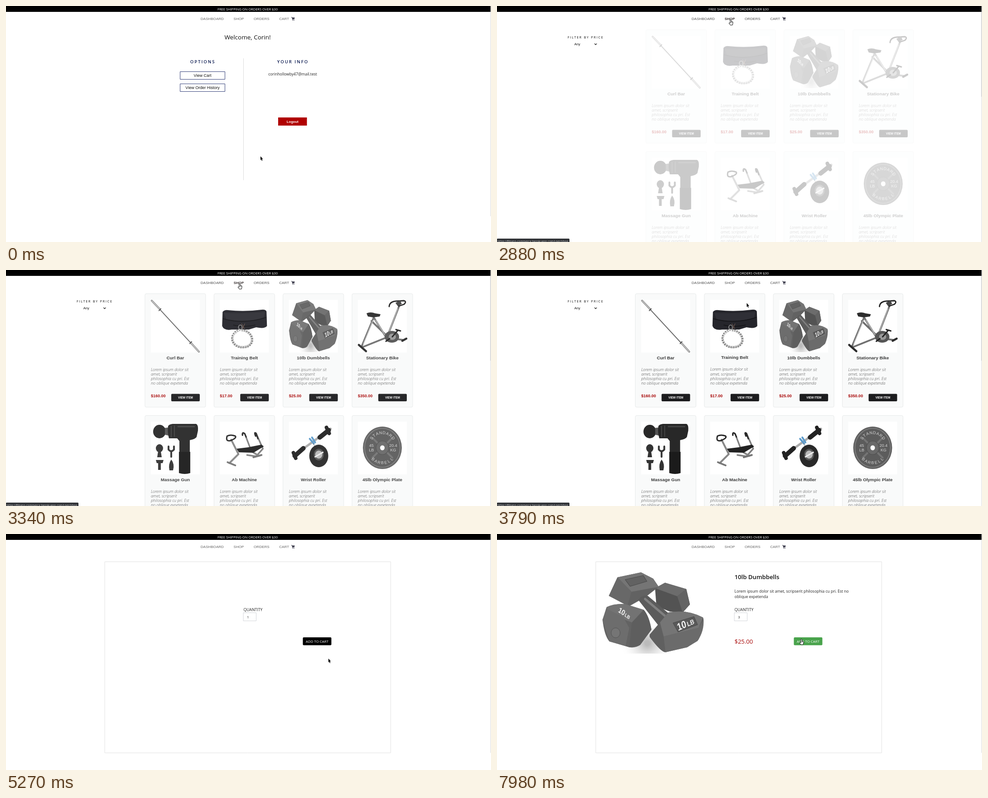
These frames come from a looping animation (1071x523 px, 8 s). An HTML page with a canvas:

```html
<!DOCTYPE html>
<html lang="en">
<head>
<meta charset="utf-8">
<title>Fitness shop</title>
<style>
html, body { margin: 0; width: 100%; height: 100%; overflow: hidden; background: #fff; }
canvas { display: block; width: 100%; height: 100%; }
</style>
</head>
<body>
<canvas id="stage" width="1071" height="523"></canvas>
<script>
const ctx = document.getElementById('stage').getContext('2d');
const LOOP = 8000, STEP = 77;
const ARIAL = '"Liberation Sans", Arial, sans-serif';
const SANS = '"Open Sans", "Noto Sans", sans-serif';
const NAVY = '#0b1a50', RED = '#a80808';

const clamp = v => Math.max(0, Math.min(1, v));
// The screen advances in ticks; returns the share of n ticks done since start.
const ticks = (t, start, n) =>
  t < start ? 0 : Math.min(n, Math.floor((t - start) / STEP + 0.15) + 1) / n;

function text(s, x, y, font, color, align = 'left', spacing = 0) {
  ctx.font = font;
  ctx.fillStyle = color;
  ctx.textAlign = align;
  ctx.letterSpacing = spacing + 'px';
  ctx.fillText(s, x, y);
}

function box(x, y, w, h, fill, stroke, r = 0) {
  ctx.beginPath();
  ctx.roundRect(x, y, w, h, r);
  if (fill) { ctx.fillStyle = fill; ctx.fill(); }
  if (stroke) { ctx.lineWidth = 1; ctx.strokeStyle = stroke; ctx.stroke(); }
}

function fill(d, color) {
  ctx.fillStyle = color;
  ctx.fill(new Path2D(d));
}

function line(d, color, w, cap = 'round') {
  ctx.lineCap = cap;
  ctx.lineJoin = 'round';
  ctx.lineWidth = w;
  ctx.strokeStyle = color;
  ctx.stroke(new Path2D(d));
}

function oval(x, y, rx, ry, color, stroke, w = 1) {
  ctx.beginPath();
  ctx.ellipse(x, y, rx, ry, 0, 0, 7);
  if (color) { ctx.fillStyle = color; ctx.fill(); }
  if (stroke) { ctx.lineWidth = w; ctx.strokeStyle = stroke; ctx.stroke(); }
}

function at(x, y, draw, sx = 1, sy = sx, turn = 0) {
  ctx.save();
  ctx.translate(x, y);
  ctx.scale(sx, sy);
  ctx.rotate(turn);
  draw();
  ctx.restore();
}

// Product pictures, each in a 108 x 116 field.
function curlBar() {
  line('M2 2L106 115', '#8a8a8a', 2.2);
  line('M2 2L106 115', '#444', 0.8);
  line('M2 2L19 20M88 95L106 115', '#777', 4);
  line('M2 2L19 20M88 95L106 115', '#ddd', 1.6);
  line('M18 24L22 20M86 97L90 93', '#555', 2.2);
}

function belt() {
  fill('M6 27Q10 22 18 23Q54 27 92 22Q101 21 103 26L104 58Q99 65 80 61L64 66H42L26 66Q9 69 5 58Z', '#25252b');
  fill('M9 29Q54 31 99 27L97 40Q54 52 14 43Z', '#2f2f36');
  line('M7 42Q54 55 102 39M30 56Q54 62 78 56', '#131316', 1.6);
  line('M48 53L54 64M55 53L50 64', '#94705f', 0.8);
  oval(45, 61, 4, 5, null, '#999', 1.5);
  ctx.setLineDash([3.5, 1.6]);
  line('M45 66C16 76 26 107 52 105C80 104 76 70 48 67', '#858585', 5, 'butt');
  line('M45 66C18 77 29 106 51 103C77 102 74 72 48 67', '#d4d4d4', 2, 'butt');
  ctx.setLineDash([]);
  line('M40 103Q54 112 68 97', '#aaa', 1.8);
}

function weightMark(x, y, size, turn) {
  at(x, y, () => {
    text('10', -size * 0.2, size * 0.36, `bold ${size}px ${ARIAL}`, '#f4f4f4', 'center');
    text('LB', size * 0.9, size * 0.36, `bold ${size * 0.66}px ${ARIAL}`, '#f4f4f4', 'center');
  }, 0.8, 1, turn);
}

// Drawn in a 226 x 181 field.
function dumbbells() {
  const glow = ctx.createRadialGradient(100, 158, 5, 100, 158, 60);
  glow.addColorStop(0, '#bbb');
  glow.addColorStop(1, 'rgba(255,255,255,0)');
  ctx.fillStyle = glow;
  ctx.fillRect(40, 125, 120, 56);
  fill('M117 36L139 24L186 38L194 72L178 90L150 88L120 76Z', '#535353');
  fill('M117 36L139 24L186 38L166 54Z', '#6c6c6c');
  fill('M166 54L186 38L194 72L178 90Z', '#636363');
  fill('M15 53L34 12L86 1L113 15L125 33L97 55L60 76L52 72Z', '#626262');
  fill('M34 12L86 1L113 15L125 33L65 44Z', '#757575');
  fill('M15 53L34 12L65 44L56 75Z', '#686868');
  fill('M51 17L91 8L99 21L62 32Z', '#626262');
  line('M51 17L91 8L99 21L62 32Z', '#4b4b4b', 1.2);
  fill('M80 62Q88 50 101 53L152 96L127 122Z', '#5c5c5c');
  line('M95 60L143 101', '#808080', 5);
  fill('M1 106L10 78Q26 70 50 71L92 84Q104 98 109 128L84 162Q74 169 60 167L16 154Q5 141 1 106Z', '#636363');
  fill('M10 78Q26 70 50 71L92 84L66 112L14 92Z', '#737373');
  fill('M66 112L92 84Q104 98 109 128L84 162L60 167Z', '#5e5e5e');
  fill('M1 106L10 82L46 99L60 124L52 164L16 154Z', '#6d6d6d');
  oval(30, 135, 10, 11, '#757575', '#555');
  fill('M105 139L146 90Q188 82 223 101Q228 112 213 150L188 167L140 178Q130 178 105 144Z', '#606060');
  fill('M146 90Q188 82 223 101L213 124L136 143L128 112Z', '#757575');
  fill('M136 143L213 124L224 106Q226 130 211 153L188 167L140 178Z', '#6b6b6b');
  fill('M157 113L203 99L211 117L168 133Z', '#595959');
  line('M157 113L203 99L211 117L168 133Z', '#484848', 1);
  weightMark(46, 89, 17, 0.5);
  weightMark(179, 117, 23, -0.35);
}

function bike() {
  line('M91 14L81 40L63 86M35 39L8 104M35 39L64 86M30 47L76 92M10 105L62 84L100 89', '#707070', 4);
  line('M88 20L80 42L66 78M33 46L12 98M39 45L62 82', '#c2c2c2', 1.5);
  fill('M19 30Q28 26 38 30L50 32L48 37L34 39L22 37Z', '#2c2c2c');
  line('M69 15Q70 4 84 3L102 2Q108 4 102 10L90 14', '#222', 2.8);
  fill('M83 7L93 1L97 9L88 14Z', '#444');
  oval(75, 82, 16, 13, '#555');
  oval(76, 82, 8, 7, '#999');
  line('M76 82L88 68M84 66L94 69M62 92L70 86', '#222', 3);
  line('M2 100L18 114M98 91L107 86', '#2b2b2b', 4.5);
}

function massageGun() {
  const dark = '#282828';
  oval(19, 22, 14, 15, dark);
  fill('M31 14L39 13V31L31 29Z', '#555');
  fill('M38 10Q40 6 48 5H100Q105 7 104 20L101 34Q98 39 86 41V68H63V43L58 37H40Q36 24 38 10Z', dark);
  line('M45 10V34M52 9V33', '#555', 1.2);
  line('M60 11H96', '#444', 3);
  fill('M62 67H87V114Q75 118 62 114Z', '#1b1b1b');
  oval(19, 59, 8, 9, '#333');
  fill('M16 66H22L24 79H14Z', '#333');
  line('M39 55V62Q45 69 51 62V55M45 66V78', '#333', 4);
  fill('M11 85H28L26 92H22V107H16V92H13Z', '#333');
  fill('M45 84Q53 94 49 108H41Q38 94 45 84Z', '#333');
}

function abMachine() {
  line('M50 30Q49 22 55 27L66 56M79 32Q75 22 80 26L95 60L80 77L60 74', '#808080', 3.5);
  line('M25 40L41 72L21 92M64 62L86 76', '#888', 4);
  line('M16 32Q12 45 24 42Q38 36 34 32Q24 28 16 32M50 30Q49 22 55 27L58 34M79 32Q75 22 80 26L84 38', '#282828', 3);
  fill('M37 60L62 57L92 51L97 55L74 69L42 68Z', '#222');
  line('M17 90L34 97M74 79L92 74', '#777', 4);
}

function wristRoller() {
  line('M10 76L92 16', '#aaa', 5);
  line('M13 76L32 59M68 35L88 19', '#222', 10);
  line('M10 69L15 81M83 13L89 26', '#222', 8);
  line('M46 38L55 49M51 35L58 46', '#5c9bcb', 4);
  line('M54 48L64 74', '#777', 1);
  oval(66, 76, 21, 25, '#292929');
  oval(66, 73, 11, 13, '#555');
  oval(66, 73, 8, 9, '#bbb');
  line('M58 78L75 68', '#eee', 3);
}

const EMBOSS = `9px ${ARIAL}`, PALE = '#d4d4d4';

function arcText(s, r, mid, spread) {
  const side = Math.sign(spread);
  [...s].forEach((ch, i) => {
    const a = mid + (i - (s.length - 1) / 2) * spread;
    at(54 + Math.cos(a) * r, 58 + Math.sin(a) * r * 1.08, () =>
      text(ch, 0, 3, EMBOSS, PALE, 'center'), 1, 1, a + side * Math.PI / 2);
  });
}

function plate() {
  oval(54, 58, 43, 47, '#626262');
  oval(54, 58, 39, 43, '#5c5c5c', '#8b8b8b', 1.2);
  line('M32 36L46 50M76 36L62 50M32 80L46 66M76 80L62 66', '#747474', 4);
  oval(54, 58, 14, 15, '#696969', '#505050', 1.2);
  oval(54, 58, 5, 5.5, '#fff');
  arcText('STANDARD', 31, -Math.PI / 2, 0.25);
  arcText('BARBELL', 31, Math.PI / 2, -0.24);
  [['45', 30, 56], ['LB', 30, 66], ['20.4', 78, 56], ['KG', 78, 66]].forEach(([s, x, y]) =>
    text(s, x, y, EMBOSS, PALE, 'center'));
}

const items = [
  ['Curl Bar', '$160.00', curlBar],
  ['Training Belt', '$17.00', belt],
  ['10lb Dumbbells', '$25.00', () => at(0, 0, dumbbells, 108 / 226, 116 / 181)],
  ['Stationary Bike', '$350.00', bike],
  ['Massage Gun', '', massageGun],
  ['Ab Machine', '', abMachine],
  ['Wrist Roller', '', wristRoller],
  ['45lb Olympic Plate', '', plate]
];
const blurb = ['Lorem ipsum dolor sit', 'amet, scripserit', 'philosophia cu pri. Est', 'no oblique expetenda'];

function card([name, price, picture], lift, green) {
  if (lift > 0) {
    ctx.save();
    ctx.shadowColor = `rgba(0,0,0,${0.28 * lift})`;
    ctx.shadowBlur = 18;
    ctx.shadowOffsetX = -3;
    ctx.shadowOffsetY = 7;
    box(0, 0, 134, 251.5, '#f9fafa', null, 3);
    ctx.restore();
  }
  box(0, 0, 134, 251.5, '#f9fafa', '#e6e9e9', 3);
  box(13, 13.5, 108, 117, '#fff');
  at(13, 13.5, picture);
  text(name, 67, 145, `bold 9.9px ${ARIAL}`, '#3a3a3a', 'center');
  blurb.forEach((s, i) => text(s, 13, 171 + i * 10.2, `italic 300 9px ${SANS}`, '#4a4a4a'));
  text(price, 13, 229.8, `bold 9px ${ARIAL}`, RED);
  box(58, 222, 63, 16.5, green ? '#1a8a1e' : '#1c1c1e', null, 2);
  text('VIEW ITEM', 89.5, 232.5, `bold 6.3px ${ARIAL}`, '#fff', 'center');
}

function header(t) {
  box(0, 0, 1070, 13, '#000');
  text('FREE SHIPPING ON ORDERS OVER $30', 533.5, 9.7, `7.5px ${SANS}`, '#fff', 'center');
  const color = t >= 2620 && t < 5190 ? '#505050' : '#666';
  const hover = t >= 2160 && t < 3710;
  text('DASHBOARD', 429.7, 31, `8.1px ${ARIAL}`, color);
  text('SHOP', 514, 31, `${hover ? 'bold 7.9' : '8.1'}px ${ARIAL}`, hover ? '#3c3434' : color, 'center');
  text('ORDERS', 547, 31, `8.1px ${ARIAL}`, color);
  text('CART', 603.2, 31, `8.1px ${ARIAL}`, color);
  fill('M630 24.6H631.8L632.2 25.6H637.6L636.8 29H632.8L633 29.8H636.6V30.6H632.3L631.2 25.5H630Z', '#3a3a4a');
  oval(633.2, 31.4, 0.8, 0.8, '#3a3a4a');
  oval(636, 31.4, 0.8, 0.8, '#3a3a4a');
}

function edge(bottom) {
  box(1069.5, 13, 1, bottom - 13, '#dcdcdc');
}

function dashboard() {
  text('Welcome, Corin!', 533.5, 73.7, `13.5px ${SANS}`, '#111', 'center');
  text('OPTIONS', 406.7, 126.6, `600 9.5px ${SANS}`, NAVY, 'left', 2);
  text('YOUR INFO', 598.8, 126.6, `600 9.5px ${SANS}`, NAVY, 'left', 2);
  box(524, 116, 1, 270, '#dcdcdc');
  ['View Cart', 'View Order History'].forEach((s, i) => {
    box(384.5, 145.5 + i * 27, 99, 17, '#fff', '#34407a');
    text(s, 434, 156.8 + i * 27, `9px ${ARIAL}`, '#111', 'center');
  });
  text('corinhollowby47@mail.test', 633, 154.4, `8.55px ${SANS}`, '#222', 'center');
  box(601, 247, 63.5, 18, '#b00000');
  text('Logout', 632.8, 258.8, `bold 7.7px ${ARIAL}`, '#fff', 'center');
  edge(466);
}

function shop(t) {
  text('FILTER BY PRICE', 156, 72.3, `6.8px ${SANS}`, '#000', 'left', 1.95);
  text('Any', 170.8, 87.4, `7.5px ${ARIAL}`, '#111');
  line('M215.6 83.6L217.8 85.8L220 83.6', '#111', 1.3);
  if (t < 2880) return edge(466);
  const left = (1 - ticks(t, 2880, 11)) ** 3;
  items.forEach((item, i) => {
    let lift = 0;
    if (i === 1) lift = clamp((t - 3787) / 200) - clamp((t - 4018) / 200);
    if (i === 2) lift = clamp((t - 4095) / 250);
    const x = 305.4 + 152.4 * (i % 4) + 31 * left;
    const y = (i < 4 ? 52.5 : 322.5) - 2.5 * lift;
    at(x, y, () => card(item, lift, i === 2 && t >= 4480));
  });
  // A white veil fades the finished cards as one layer.
  box(300, 45, 700, 478, `rgba(255,255,255,${left})`);
  edge(523);
  box(1069.5, 13, 1, 188, '#c8c8c8');
}

function product(t) {
  box(218.5, 61.5, 631, 423.5, null, '#e2e2e2');
  if (t >= 5420) {
    at(232, 84, dumbbells);
    text('10lb Dumbbells', 524.5, 100.2, `600 13.2px ${SANS}`, '#111');
    text('Lorem ipsum dolor sit amet, scripserit philosophia cu pri. Est no', 524.5, 129.6, `8.5px ${SANS}`, '#222');
    text('oblique expetenda', 524.5, 141.6, `8.5px ${SANS}`, '#222');
    text('$25.00', 524.5, 243.2, `500 13px ${SANS}`, RED);
  }
  text('QUANTITY', 524.5, 171.3, `8.7px ${SANS}`, '#222');
  const focused = t >= 6490 && t < 7980;
  box(524.5, 174.5, 28, 18, '#fff', focused ? '#444' : '#d3d6da');
  text(t < 6640 ? '1' : t < 6870 ? '2' : '3', 532.2, 186.8, `7.5px ${SANS}`, '#222');
  if (t >= 6260 && t < 7260) {
    box(543, 177, 7, 13, '#eee');
    fill('M544.6 182L546.5 179.6L548.4 182ZM544.6 185L546.5 187.4L548.4 185Z', '#555');
  }
  box(655.5, 229, 63, 17.5, t >= 7725 ? '#49a34c' : '#000', null, 2);
  text('ADD TO CART', 687, 240.8, `500 7.9px ${SANS}`, '#fff', 'center');
  edge(485);
}

function status(t) {
  if (t < 2390 || t >= 3860) return;
  ctx.save();
  ctx.globalAlpha = t < 2470 ? 0.5 : 1;
  box(0, 515.5, 160, 10, '#2e3034', null, 1.5);
  text('https://fitness-commerce.herokuapp.com/user/shop', 1, 523.6, `6.4px ${SANS}`, '#d8dadd');
  ctx.restore();
}

// start, ticks, destination
const moves = [
  [1300, 11, 516, 38], [2160, 2, 516, 29.4], [3710, 11, 711, 271], [4560, 1, 712, 274.3],
  [5190, 1, 712, 276], [5420, 11, 555, 187], [6260, 2, 541, 179], [7190, 9, 672, 232.4]
];

function pointer(t) {
  let x = 562, y = 333;
  for (const [start, n, tx, ty] of moves) {
    const u = ticks(t, start, n);
    x += (tx - x) * u;
    y += (ty - y) * u;
  }
  const hand = (t >= 2060 && t < 3710) || (t >= 4480 && t < 5190) || t >= 7725;
  at(x, y, () => {
    if (hand) {
      const d = 'M-1.2 1Q0 -.4 1.2 1V5L4.4 5.6Q5.2 6 5 8.4L4 12.8H-1L-3.8 8.8Q-4 7 -1.2 8.4Z';
      fill(d, '#fff');
      line(d, '#111', 1);
      line('M1.2 5V7.5M3 5.4V7.5', '#111', 0.6);
    } else {
      const d = 'M0 0V8.6L1.8 7L3 10.2L4.3 9.6L3 6.6L5.4 6.2Z';
      line(d, '#fff', 1);
      fill(d, '#000');
    }
  });
}

function draw(t) {
  ctx.fillStyle = '#fff';
  ctx.fillRect(0, 0, 1071, 523);
  header(t);
  if (t < 2620) dashboard();
  else if (t < 5190) shop(t);
  else product(t);
  status(t);
  pointer(t);
}

let begin;
function frame(now) {
  begin ??= now;
  draw((now - begin) % LOOP);
  requestAnimationFrame(frame);
}
requestAnimationFrame(frame);
</script>
</body>
</html>
```
